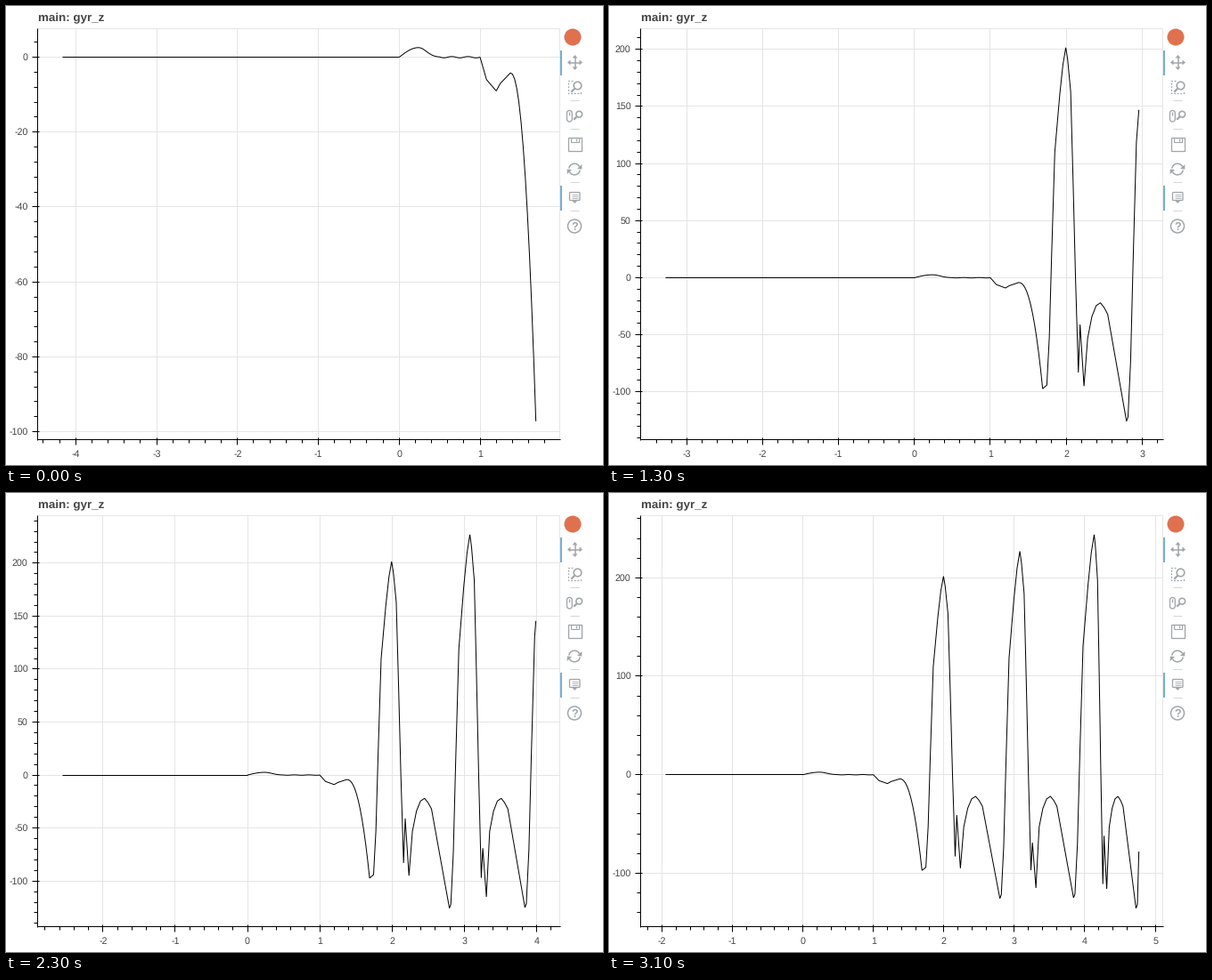
These frames come from a looping animation (670x516 px, 3.2 s). A matplotlib script:

```python
import math

import numpy as np
import matplotlib.pyplot as plt
from matplotlib.animation import FuncAnimation
from matplotlib.patches import Circle, FancyBboxPatch, Polygon, Rectangle

W, H, DPI = 670, 516, 100
PX = 72 / DPI                       # points per pixel
LEFT, TOP, RIGHT, BOTTOM = 35, 25.3, 621, 487.3
DATA_X, DATA_W = 35.75, 585         # horizontal extent of the data range
PAD = 0.05
INK, GRID, ICON, BLUE = "#444444", "#e5e5e5", "#a1a6a9", "#74b0d6"

plt.rcParams["font.family"] = "Liberation Sans"
plt.rcParams["text.hinting"] = "none"

# Rolling window: time in ms, first and last second of signal in view
WINDOW = np.array([
    (0, -4.17, 1.69), (500, -3.825, 2.196), (900, -3.51, 2.602),
    (1300, -3.287, 2.958), (2000, -2.788, 3.679), (2500, -2.42, 4.2),
    (3100, -1.956, 4.767)]).T

# Each swing: trough time and level, peak time and level, landing levels
SWINGS = [
    (1.745, -97, 1.995, 201.5, -83, -41, -95),
    (2.815, -125.7, 3.078, 226.9, -97, -69, -115),
    (3.86, -125, 4.133, 243.8, -111, -62, -116),
]
END_TROUGH = (4.746, -135.6)


def warm_up(t):
    """Small bump and ripple of the first second."""
    rise = np.sin(np.pi / 2 * t / 0.24)
    fall = np.exp(-((t - 0.24) / 0.135) ** 2)
    ripple = np.where(t > 0.5, 0.18 * np.sin(10 * np.pi * (t - 0.6)), 0)
    return 2.57 * np.where(t < 0.24, rise, fall) + ripple


def plunge(u):
    return -4.2 - 93 * u ** 2.25


def swing(t0, low, t1, high, slam, bounce, dip, t2, next_low):
    """Key points of one swing: rise, fall, landing, rest, next trough."""
    start = low * 0.97
    rise = [(0.13, 0.14), (0.25, 0.38), (0.42, 0.69), (0.68, 0.86),
            (0.85, 0.95), (1, 1)]
    after = [(0.03, 0.95 * high), (0.08, 0.81 * high), (0.12, 0.42 * high),
             (0.16, 0), (0.207, slam), (0.235, bounce), (0.3, dip),
             (0.36, -53), (0.43, -34), (0.5, -24.5), (0.57, -22),
             (0.63, -26), (0.69, -32), (1, next_low)]
    yield t0, start
    for u, k in rise:
        yield t0 + u * (t1 - t0), start + k * (high - start)
    for u, v in after:
        yield t1 + u * (t2 - 0.02 - t1), v


def signal():
    t = np.arange(0, 1, 0.025)
    points = list(zip(t, warm_up(t)))
    points += [(1, 0), (1.08, -6), (1.2, -9), (1.25, -7)]
    points += [(1.375 + 0.315 * u, plunge(u)) for u in np.linspace(0, 1, 13)]
    ends = [s[:2] for s in SWINGS[1:]] + [END_TROUGH]
    for s, end in zip(SWINGS, ends):
        points += swing(*s, *end)
    return np.array(points + [(4.746, -132), (4.767, -78)]).T


SIG_T, SIG_V = signal()

fig = plt.figure(figsize=(W / DPI, H / DPI), dpi=DPI, facecolor="white")
ax = fig.add_axes([0, 0, 1, 1])
ax.set_xlim(0, W)
ax.set_ylim(H, 0)
ax.axis("off")


def line(xs, ys, color="black", width=1, z=2, **kw):
    kw.setdefault("solid_capstyle", "butt")
    return ax.plot(xs, ys, color=color, lw=width * PX, zorder=z, **kw)[0]


def label(x, y, text, size=10.67, ha="center", color=INK, **kw):
    return ax.text(x, y, text, fontsize=size * PX, ha=ha, va="baseline",
                   color=color, **kw)


def shape(patch):
    ax.add_patch(patch)


def solid(*points):
    shape(Polygon(points, fc=ICON, lw=0))


def ring(x, y, r, width=1.5):
    shape(Circle((x, y), r, fill=False, ec=ICON, lw=width * PX))


def box(x, y, w, h, r=0, width=1.3):
    style = f"round,pad=0,rounding_size={r}" if r else "square,pad=0"
    shape(FancyBboxPatch((x, y), w, h, boxstyle=style, fill=False,
                         ec=ICON, lw=width * PX))


def lens(x, y, r, tail):
    ring(x, y, r, 1.6)
    d = r * 0.75
    line([x - d, x - d - tail], [y + d, y + d + tail], ICON, 2.2)


def draw_toolbar():
    shape(Circle((636, 35), 9.5, fc="#e0714f", lw=0))
    for y in (50, 202):
        shape(Rectangle((622, y), 2, 28, fc=BLUE, lw=0))
    for y in (106, 138, 198, 230):
        line([633, 643], [y, y], "#d4d6d8")

    # pan
    cx, cy = 638.5, 63.5
    line([cx - 6, cx + 6], [cy, cy], ICON, 1.5)
    line([cx, cx], [cy - 6, cy + 6], ICON, 1.5)
    for s in (-1, 1):
        solid((cx + 8.5 * s, cy), (cx + 5 * s, cy - 3), (cx + 5 * s, cy + 3))
        solid((cx, cy + 8.5 * s), (cx - 3, cy + 5 * s), (cx + 3, cy + 5 * s))

    # box zoom
    line([636, 631, 631, 645, 645], [84, 84, 98, 98, 95], ICON, 1.2,
         dashes=(1.6, 1.4), dash_capstyle="butt")
    lens(641.5, 89.5, 4.3, 4)

    # wheel zoom
    box(629.5, 117.5, 5.8, 12.5, 2.8)
    line([632.4, 632.4], [119, 123], ICON, 1.2)
    lens(643.2, 121.7, 3.4, 3.5)

    # save
    box(630.5, 147.5, 15, 15)
    box(634, 147.5, 8.5, 5, width=1.1)
    line([640, 640], [149, 151.5], ICON, 1.2)

    # reset
    for turn in (0, math.pi):
        a = np.linspace(math.pi * 1.05, math.pi * 1.85, 20) + turn
        line(638 + 6.3 * np.cos(a), 183.5 + 6.3 * np.sin(a), ICON, 1.5)
        s = math.cos(turn)
        solid((638 + 8.3 * s, 183.5 - 5.5 * s), (638 + 8.3 * s, 183.5),
              (638 + 3 * s, 183.5 - 0.5 * s))

    # hover
    box(632.5, 209.5, 11.5, 9, 1)
    for y in (212, 214, 216):
        line([634.5, 642], [y, y], ICON, 0.8)
    solid((635.5, 219), (641, 219), (638.2, 222))

    # help
    ring(638, 247.5, 7.5)
    label(638.2, 252, "?", 12.5, color=ICON, weight="bold")


def tick_step(span):
    steps = [m * 10.0 ** e for e in range(-1, 3) for m in (1, 2, 5)]
    return min(steps, key=lambda s: abs(6 - span / s))


def ticks(lo, hi):
    """Yield (value, is_major) for every tick in the range."""
    small = tick_step(hi - lo) / 5
    for k in range(math.ceil(lo / small), math.floor(hi / small) + 1):
        yield k * small, k % 5 == 0


def padded(lo, hi):
    pad = PAD * (hi - lo)
    return lo - pad, hi + pad


def draw_plot(ms):
    start, end = (np.interp(ms, WINDOW[0], row) for row in WINDOW[1:])
    seen = SIG_T < end
    t = np.append(SIG_T[seen], end)
    v = np.append(SIG_V[seen], np.interp(end, SIG_T, SIG_V))
    x0, x1 = padded(start, end)
    y0, y1 = padded(v.min(), v.max())

    def to_x(u):
        return DATA_X + (u - x0) / (x1 - x0) * DATA_W

    def to_y(u):
        return BOTTOM - (u - y0) / (y1 - y0) * (BOTTOM - TOP)

    made = []
    for u, major in ticks(x0, x1):
        x = to_x(u)
        if major:
            made.append(line([x, x], [TOP, BOTTOM], GRID, z=1))
            made.append(label(x + 0.5, 507, f"{u:g}"))
        made.append(line([x, x], [BOTTOM - 2 * major,
                                  BOTTOM + (6 if major else 4)], z=4))
    for u, major in ticks(y0, y1):
        y = to_y(u)
        if major:
            made.append(line([LEFT, RIGHT], [y, y], GRID, z=1))
            made.append(label(24.5, round(y) + 4, f"{u:g}", ha="right"))
        made.append(line([LEFT - (6 if major else 4),
                          LEFT + 2 * major], [y, y], z=4))

    zero = to_y(0)
    made.append(line([to_x(start) + 0.5, to_x(0) + 0.5], [zero, zero], z=3))
    made.append(line(to_x(t) + 0.5, to_y(v) + 0.5, z=3,
                     solid_joinstyle="bevel"))
    return made


label(36, 17, "main: gyr_z", 13.33, ha="left", weight="bold")
line([LEFT, RIGHT], [TOP, TOP], GRID)
line([RIGHT, RIGHT], [TOP, BOTTOM], GRID)
line([LEFT, LEFT], [TOP, BOTTOM + 1], z=4)
line([LEFT, RIGHT + 1], [BOTTOM, BOTTOM], z=4)
draw_toolbar()

live = []


def update(i):
    while live:
        live.pop().remove()
    live.extend(draw_plot(i * 100))
    return live


anim = FuncAnimation(fig, update, frames=32, interval=100, repeat=True)
plt.show()
```
